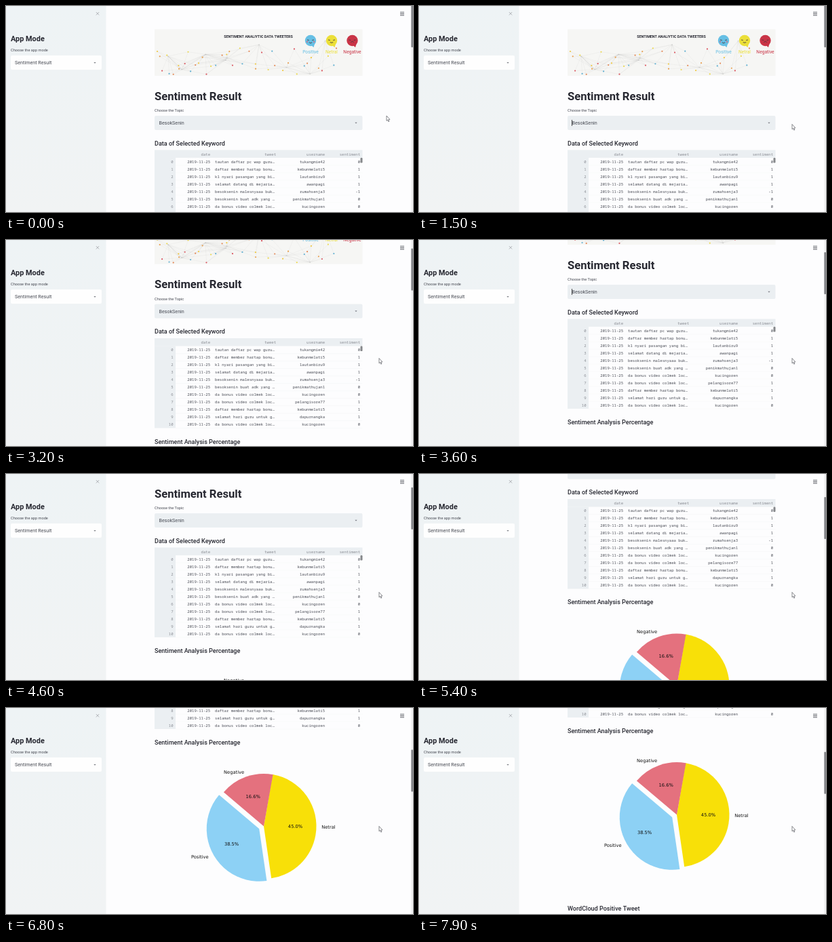
These frames come from a looping animation (600 by 304 pixels, 8000 ms). An HTML page with a canvas:

```html
<!DOCTYPE html>
<html lang="en">
<head>
<meta charset="utf-8">
<title>Sentiment Result</title>
<style>
  html, body { margin: 0; width: 100%; height: 100%; overflow: hidden; background: #fdfdfe; }
  canvas { display: block; width: 600px; height: 304px; }
</style>
</head>
<body>
<canvas id="stage"></canvas>
<script>
const W = 600, H = 304, LOOP = 8000, STEP = 100;
const LEFT = 219, RIGHT = 525.5;
const canvas = document.getElementById('stage');
const ratio = window.devicePixelRatio || 1;
canvas.width = W * ratio;
canvas.height = H * ratio;
const ctx = canvas.getContext('2d');

const SANS = 'Roboto, sans-serif';
const MONO = '"Noto Sans Mono", monospace';
const CHART = '"DejaVu Sans", sans-serif';
const INK = '#262730', SOFT = '#484b54', GREY = '#898c93', PANEL = '#ebeff2';

const GLIDES = [
  { start: 2150, end: 3900, distance: 104 },
  { start: 4800, end: 6330, distance: 210 },
  { start: 7500, end: 7950, distance: 17.5 }
];

const ROWS = [
  ['tautan daftar pc wap guru…', 'tukangmie42', 0],
  ['daftar member hartap bonu…', 'kebunmelati5', 1],
  ['kl nyari pasangan yang bi…', 'lautanbiru9', 1],
  ['selamat datang di mejaria…', 'awanpagi', 1],
  ['besoksenin malesnyaaa buk…', 'rumahsenja3', -1],
  ['besoksenin buat adk yang …', 'penikmathujan1', 0],
  ['da bonus video colmek loc…', 'kucingoren', 0],
  ['da bonus video colmek loc…', 'pelangisore77', 1],
  ['daftar member hartap bonu…', 'kebunmelati5', 1],
  ['selamat hari guru untuk g…', 'dapurnangka', 1],
  ['da bonus video colmek loc…', 'kucingoren', 0]
];

const clamp = u => Math.min(1, Math.max(0, u));
const smooth = u => u * u * (3 - 2 * u);
const scrollAt = t => GLIDES.reduce((sum, { start, end, distance }) =>
  sum + distance * smooth(clamp((t - start) / (end - start))), 0);

function randomizer(seed) {
  return () => (seed = (seed * 16807) % 2147483647) / 2147483647;
}

function text(str, x, y, size, { color = INK, weight = 400, family = SANS, align = 'left' } = {}) {
  ctx.font = `${weight} ${size}px ${family}`;
  ctx.fillStyle = color;
  ctx.textAlign = align;
  ctx.fillText(str, x, y);
}

function box(x, y, w, h, color, radius = 0) {
  ctx.fillStyle = color;
  ctx.beginPath();
  ctx.roundRect(x, y, w, h, radius);
  ctx.fill();
}

function disc(x, y, r, color) {
  ctx.fillStyle = color;
  ctx.beginPath();
  ctx.arc(x, y, r, 0, 7);
  ctx.fill();
}

function polygon(points, fill) {
  ctx.fillStyle = fill;
  ctx.beginPath();
  points.forEach(([x, y]) => ctx.lineTo(x, y));
  ctx.closePath();
  ctx.fill();
}

function line(x0, y0, x1, y1, color, width) {
  ctx.strokeStyle = color;
  ctx.lineWidth = width;
  ctx.beginPath();
  ctx.moveTo(x0, y0);
  ctx.lineTo(x1, y1);
  ctx.stroke();
}

const dropArrow = (x, y) => polygon([[x - 1.7, y - 0.8], [x + 1.7, y - 0.8], [x, y + 1]], '#777a82');

function bubble(x, label, color, smile) {
  const y = 51;
  polygon([[x + 1, y + 7], [x + 6, y + 5], [x + 4.5, y + 10]], color);
  disc(x, y, 8.2, color);
  for (const side of [-1, 1]) {
    line(x + side * 5, y - 1, x + side * 2.2, y - 0.5, '#4a3c40', 0.9);
    if (smile > 2) disc(x + side * 5, y + 1.8, 1, '#e4607a');
  }
  ctx.beginPath();
  ctx.moveTo(x - 2.2, y + 2.5);
  ctx.quadraticCurveTo(x, y + 2.5 + smile, x + 2.2, y + 2.5);
  ctx.stroke();
  text(label, x, 69.5, 6.7, { color, align: 'center' });
}

// Scattered dots, denser to the left, joined to nearby grey hubs
function network() {
  const random = randomizer(77);
  const colors = ['#f0c940', '#e9a050', '#dc5a64', '#ecd950', '#62b1d3', '#e58a58'];
  const scatter = (count, top) => Array.from({ length: count }, (_, i) => [
    LEFT + 4 + 270 * ((i + random()) / count) ** 1.2,
    top + (101 - top) * random()
  ]);
  const dots = scatter(42, 62), hubs = scatter(9, 50);
  for (const [x0, y0] of hubs) {
    for (const [x1, y1] of [...dots, ...hubs]) {
      if (Math.hypot(x1 - x0, y1 - y0) < 46) line(x0, y0, x1, y1, 'rgba(150,150,150,.15)', 0.5);
    }
    disc(x0, y0, 0.8, '#cfcfcd');
  }
  dots.forEach(([x, y], i) => disc(x, y, 1.1, colors[i % colors.length]));
}

function banner() {
  const title = 'SENTIMENT ANALIYTIC DATA TWEETERS', titleWidth = 102;
  const titleFont = size => `700 condensed ${size}px ${SANS}`;
  box(LEFT, 34.5, RIGHT - LEFT, 68.5, '#f6f6f4');
  network();
  // Largest condensed type that leaves room for the bubbles
  ctx.font = titleFont(10);
  ctx.font = titleFont(10 * titleWidth / ctx.measureText(title).width);
  ctx.fillStyle = INK;
  ctx.textAlign = 'center';
  ctx.fillText(title, 372, 47);
  bubble(449, 'Positive', '#66bfe4', 3);
  bubble(480, 'Netral', '#ebdf38', 1.5);
  bubble(510.5, 'Negative', '#c93446', -2.5);
}

function table() {
  const top = 212.5, first = 224, pitch = 11, bottom = first + pitch * ROWS.length;
  const cell = (str, x, y, color = SOFT, align = 'right') =>
    text(str, x, y, 5.64, { family: MONO, color, align });
  box(LEFT, top, RIGHT - LEFT, first - top, PANEL);
  box(LEFT, first, 31, bottom - first, PANEL);
  cell('date', 301, 220.5, GREY);
  cell('tweet', 398, 220.5, GREY);
  cell('username', 470, 220.5, GREY);
  cell('sentiment', 522, 220.5, GREY);
  ROWS.forEach(([tweet, user, score], i) => {
    const y = first + i * pitch;
    cell(i, 246.5, y + 7.8, GREY);
    cell('2019-11-25', 301, y + 7.8);
    cell(tweet, 308, y + 7.8, SOFT, 'left');
    cell(user, 470, y + 7.8);
    cell(score, 522, y + 7.8);
    line(250, y + pitch, RIGHT, y + pitch, '#f2f4f5', 0.5);
  });
  box(522.5, first, 3, 7.5, '#85878a', 1.2);
}

function pie() {
  const cx = 380, cy = 488.5, r = 77.5, rad = Math.PI / 180;
  let angle = -80.3;
  for (const [label, percent, color, explode, align] of [
    ['Netral', 45, '#f8e008', 0, 'left'],
    ['Positive', 38.5, '#8dd1f5', 0.1, 'right'],
    ['Negative', 16.6, '#e4717e', 0, 'right']
  ]) {
    const end = angle + percent * 3.6, mid = (angle + end) / 2 * rad;
    const at = d => [cx + Math.cos(mid) * r * d, cy + Math.sin(mid) * r * d];
    const write = (str, d, side) => {
      const [x, y] = at(explode + d);
      text(str, x, y + 2.3, 6.7, { family: CHART, color: '#111', align: side });
    };
    const [x, y] = at(explode);
    ctx.fillStyle = color;
    ctx.beginPath();
    ctx.moveTo(x, y);
    ctx.arc(x, y, r, angle * rad, end * rad);
    ctx.fill();
    write(percent.toFixed(1) + '%', 0.6, 'center');
    write(label, 1.1, align);
    angle = end;
  }
}

function page(caretOn) {
  const heading = (str, y) => text(str, LEFT, y, 9.05, { weight: 500 });
  banner();
  text('Sentiment Result', LEFT, 138.7, 16.6, { weight: 700 });
  text('Choose the Topic', LEFT, 156, 5.6, { color: SOFT });
  box(LEFT, 162, RIGHT - LEFT, 21, PANEL, 2);
  text('BesokSenin', 225.5, 175.2, 7.15, { color: SOFT });
  if (caretOn) box(225, 168, 0.8, 9, '#222');
  dropArrow(516, 172.5);
  heading('Data of Selected Keyword', 205.8);
  table();
  heading('Sentiment Analysis Percentage', 368);
  pie();
  heading('WordCloud Positive Tweet', 630);
}

function sidebar() {
  const shade = ctx.createLinearGradient(0, 0, 0, H);
  shade.addColorStop(0, '#eef3f5');
  shade.addColorStop(1, '#f1f3f4');
  box(0, 0, 147.5, H, shade);
  for (const side of [-1, 1]) line(135 - side * 2.2, 9, 135 + side * 2.2, 13.4, '#a2a5aa', 0.8);
  text('App Mode', 7, 52.2, 10.9, { weight: 700 });
  text('Choose the app mode', 7, 67, 5.64, { color: SOFT });
  box(7, 73, 134, 21, '#fefefe', 2);
  text('Sentiment Result', 13, 86.2, 7.2, { color: SOFT });
  dropArrow(131, 83.7);
}

function pointer(x, y) {
  ctx.save();
  ctx.translate(x, y);
  polygon([[0, 0], [0, 7.4], [1.6, 6], [2.8, 8.7], [3.9, 8.2], [2.8, 5.6], [4.9, 5.4]], '#fff');
  ctx.strokeStyle = '#55575d';
  ctx.lineWidth = 0.7;
  ctx.stroke();
  ctx.restore();
}

function draw(t) {
  const offset = scrollAt(t), moved = clamp(t / 400);
  const caretOn = t >= 390 && Math.floor((t - 390) / 530) % 2 === 0;
  ctx.setTransform(ratio, 0, 0, ratio, 0, 0);
  box(0, 0, W, H, '#fdfdfe');
  ctx.save();
  ctx.translate(0, -offset);
  page(caretOn);
  ctx.restore();
  sidebar();
  for (const y of [9.2, 11.5, 13.8]) line(581, y, 587, y, '#4a4c54', 0.9);
  box(597, 0, 3, H, '#f1f1f2');
  box(597.3, offset * 0.199 - 1, 2.7, 62, '#85868a', 1);
  pointer(561 - 11 * moved, 162 + 12.5 * moved);
}

const start = performance.now();
function tick() {
  const t = (performance.now() - start) % LOOP;
  draw(Math.floor(t / STEP) * STEP);
  requestAnimationFrame(tick);
}
tick();
</script>
</body>
</html>
```
